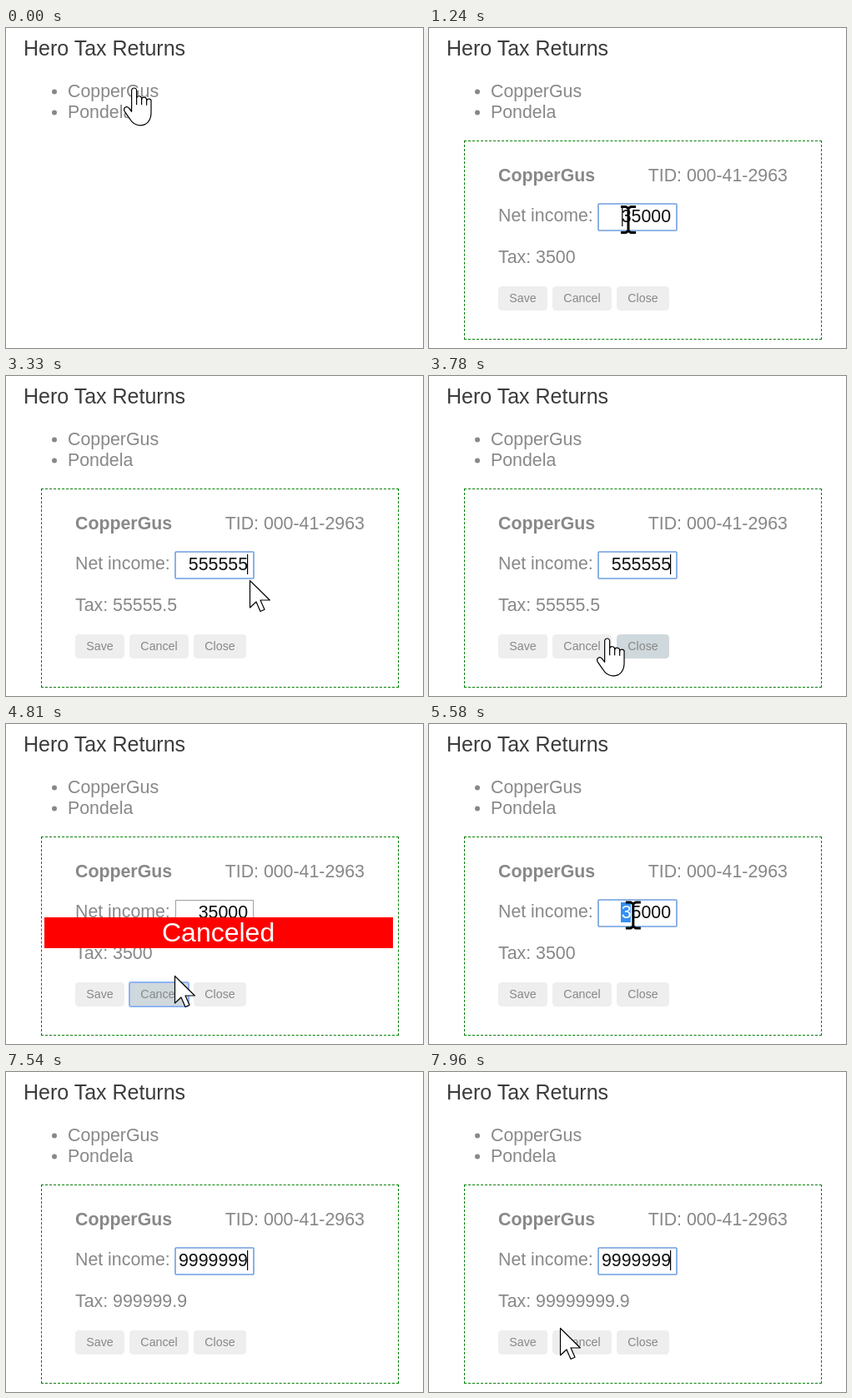
Animation of 500 by 384 pixels, one loop 7990 ms. Source, as an HTML page:

```html
<!DOCTYPE html>
<html lang="en">
<head>
<meta charset="utf-8">
<title>Hero Tax Returns</title>
<style>
  html, body { margin: 0; width: 100%; height: 100%; overflow: hidden; background: #fff; }
  svg { display: block; position: relative; }
  #frame { position: absolute; left: 42px; top: 135px; width: 427px; height: 237px; border: 1px dashed green; }
  text { font: 21.33px "Liberation Sans", Arial, sans-serif; fill: #888; white-space: pre; }
  .title { font-size: 25px; fill: #3c3c3c; }
  .bold { font-weight: bold; }
  .button text { font-size: 14.22px; text-anchor: middle; }
  .banner text { font-size: 32px; text-anchor: middle; fill: #fff; }
  .value { text-anchor: end; fill: #111; }
  .cursor { stroke: #000; fill: #fff; stroke-width: 1.2; stroke-linejoin: round; }
</style>
</head>
<body>
<div id="frame"></div>
<svg width="500" height="384" viewBox="0 0 500 384">
  <text class="title" x="21" y="33">Hero Tax Returns</text>
  <g fill="#888"><circle cx="58" cy="76.5" r="3"/><circle cx="58" cy="101.5" r="3"/></g>
  <text x="74" y="83">CopperGus</text>
  <text x="74" y="108">Pondela</text>

  <g id="panel">
    <text class="bold" x="83" y="184">CopperGus</text>
    <text x="262.7" y="184">TID: 000-41-2963</text>
    <text x="83" y="232">Net income:</text>
    <text id="tax" x="83" y="282"></text>

    <rect id="field" fill="#fff"/>
    <rect id="selection" x="230" y="214" height="24" fill="#3390f5"/>
    <svg x="206.5" y="212" width="89" height="30">
      <text class="value" x="83.5" y="21"><tspan id="picked" fill="#fff"></tspan><tspan id="plain"></tspan></text>
    </svg>
    <rect id="caret" y="214" width="1.2" height="24"/>
    <g id="buttons"></g>

    <g id="banner" class="banner">
      <rect x="46" y="232" width="418" height="37" fill="red"/>
      <text x="254.6" y="261">Canceled</text>
    </g>
  </g>

  <g class="cursor">
    <path id="arrow" d="M.5.5V33l7.5-7 5 11.5 5-2.2-5-11.3h11.3z"/>
    <g id="hand">
      <path d="M-3 29V4a3 3.3 0 0 1 6 0v9a3 2.8 0 0 1 6 .5v1a3 2.8 0 0 1 6 .5v1a2.7 2.7 0 0 1 5.4 1v13C20.4 40 15 45.5 7 45.5C1 45.5-2 43-5 38L-11.5 28.5C-13.5 24.5-9 21.5-6 25z"/>
      <path fill="none" d="M3 13v8M9 14v7M15 15.5v6"/>
    </g>
    <path id="ibeam" fill="none" stroke-width="3" d="M-9-15.5h6l3 2 3-2h6M0-14V14M-9 15.5h6l3-2 3 2h6"/>
  </g>
</svg>
<script>
const LOOP = 7990, DIGIT = 11.86, TEXT_END = 290;
const el = id => document.getElementById(id);
const show = (id, on) => el(id).style.display = on ? '' : 'none';
const set = (node, attrs) => { for (const k in attrs) node.setAttribute(k, attrs[k]); };
const within = (t, from, to) => t >= from && t < to;

// time, x, y, cursor shape from this time on
const path = [
  [0, 153.6, 71.3, 'hand'], [590, 153.6, 71.3, 'hand'], [780, 172, 113, 'arrow'],
  [1130, 232, 212, 'ibeam'], [1240, 239, 230, 'ibeam'], [1410, 239, 230, 'ibeam'],
  [1680, 304, 238, 'ibeam'], [1940, 304, 238, 'ibeam'], [1940, 305, 233, 'arrow'],
  [2060, 305, 226, 'arrow'], [2460, 305, 226, 'arrow'], [2460, 302, 226, 'arrow'],
  [2720, 302, 226, 'none'], [3270, 299, 226, 'arrow'], [3540, 268, 310, 'hand'],
  [3740, 226, 314, 'hand'], [3780, 213.8, 314.3, 'hand'], [3870, 200, 314, 'hand'],
  [4200, 200, 314, 'hand'], [4420, 200, 318, 'hand'], [4600, 200, 318, 'hand'],
  [4650, 200, 310, 'hand'], [4810, 200, 310, 'hand'], [4810, 202, 302, 'arrow'],
  [4930, 202, 302, 'arrow'], [5300, 226, 243, 'ibeam'], [5420, 236, 229, 'ibeam'],
  [5550, 236, 229, 'ibeam'], [5820, 313, 233, 'ibeam'], [5980, 313, 233, 'ibeam'],
  [5980, 309, 231, 'arrow'], [6490, 303, 221, 'arrow'], [6720, 303, 221, 'none'],
  [7600, 301, 222, 'arrow'], [7960, 157, 307, 'arrow']
];

function pointer(t) {
  const i = Math.max(0, path.findLastIndex(p => p[0] <= t));
  const [t0, x0, y0, shape] = path[i];
  const [t1, x1, y1] = path[i + 1] || [t0 + 1, x0, y0];
  const k = Math.min(1, Math.max(0, (t - t0) / (t1 - t0)));
  return { x: x0 + (x1 - x0) * k, y: y0 + (y1 - y0) * k, shape };
}

const buttons = [['Save', 83, 59], ['Cancel', 148, 71], ['Close', 225, 63]].map(([label, x, w]) => {
  const ns = 'http://www.w3.org/2000/svg';
  const group = document.createElementNS(ns, 'g');
  const box = document.createElementNS(ns, 'rect');
  const text = document.createElementNS(ns, 'text');
  group.setAttribute('class', 'button');
  set(box, { x, y: 310, width: w, height: 29, rx: 4.5, 'stroke-width': 2 });
  set(text, { x: x + w / 2, y: 329 });
  text.textContent = label;
  group.append(box, text);
  el('buttons').append(group);
  return { label, x, w, box };
});

function income(t) {
  if (within(t, 2720, 4620)) return '5'.repeat(t >= 3270 ? 6 : Math.min(5, 1 + Math.floor((t - 2720) / 80)));
  if (t >= 6950) return '9'.repeat(t < 7250 ? 1 : Math.min(9, 2 + Math.floor((t - 7250) / 50)));
  return '35000';
}

function selected(t, p) {
  const start = within(t, 1440, 2720) ? 239 : within(t, 5580, 6950) ? 236 : 0;
  if (!start) return 0;
  return p.shape === 'ibeam' ? Math.max(0, Math.min(5, Math.round((p.x - start) / 12))) : 5;
}

function draw(t) {
  const p = pointer(t), value = income(t), count = selected(t, p);
  const focused = within(t, 1240, 4300) || t >= 5580;
  show('frame', t >= 260);
  show('panel', t >= 260);
  show('banner', within(t, 4620, 5150));

  el('tax').textContent = 'Tax: ' + value / 10;
  el('picked').textContent = value.slice(0, count);
  el('plain').textContent = value.slice(count);
  set(el('selection'), { width: count * DIGIT });
  set(el('field'), focused
    ? { x: 203, y: 211, width: 94, height: 32, rx: 1, stroke: '#6f9fe0', 'stroke-width': 1.6 }
    : { x: 203.5, y: 211.5, width: 93, height: 31, rx: 0, stroke: '#a0a0a0', 'stroke-width': 1 });
  show('caret', focused && !count);
  set(el('caret'), { x: value === '35000' ? TEXT_END - 5 * DIGIT + .5 : TEXT_END - 1 });

  // Hover follows the pointer slightly late.
  const late = pointer(t - 40);
  for (const b of buttons) {
    const hover = late.shape === 'hand' && within(late.x, b.x, b.x + b.w) && within(late.y, 310, 339);
    const active = b.label === 'Cancel' && within(t, 4300, 5580);
    set(b.box, { fill: hover ? '#cfd8dc' : '#eee', stroke: active ? '#8fb4f0' : 'none', rx: active ? 2 : 4.5 });
  }

  for (const shape of ['arrow', 'hand', 'ibeam']) {
    show(shape, shape === p.shape);
    set(el(shape), { transform: `translate(${p.x} ${p.y})` });
  }
}

function tick() {
  draw(performance.now() % LOOP);
  requestAnimationFrame(tick);
}
tick();
</script>
</body>
</html>
```
